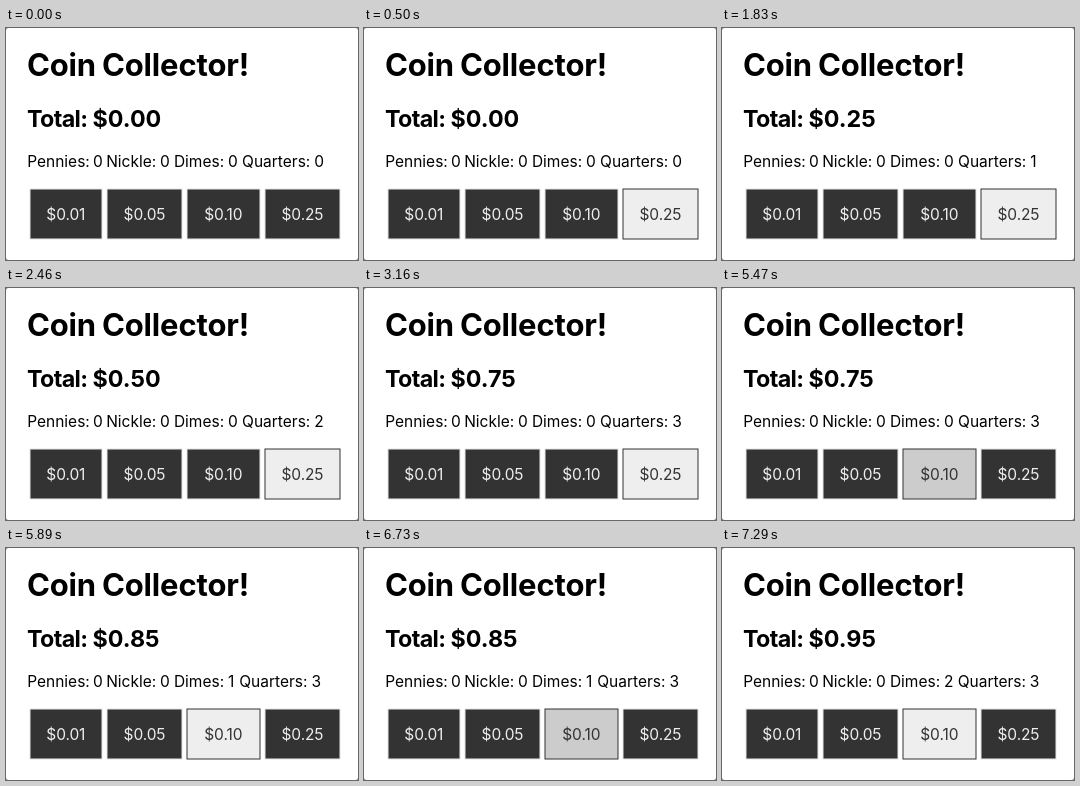
Write an HTML page that moves like this. It is 352 px wide and 232 px high and loops after 8 s.

```html
<!DOCTYPE html>
<html lang="en">
<head>
<meta charset="utf-8">
<title>Coin Collector!</title>
<style>
  html, body { margin: 0; width: 100%; height: 100%; overflow: hidden; background: #8c8c8c; }
  svg { display: block; width: 352px; height: 232px; }
  text { font: 15.5px Inter, "Liberation Sans", sans-serif; font-optical-sizing: none; fill: #000; }
  .mid text, text.mid { text-anchor: middle; }
  .title text { font-size: 31px; font-weight: 700; letter-spacing: -.15px; }
  .total text { font-size: 23.3px; font-weight: 700; }
  .total .label { letter-spacing: -.65px; }
  .coin rect { fill: #333; stroke: #e6e6e6; }
  .coin text { fill: #eee; letter-spacing: -.1px; text-anchor: middle; }
  .hover rect { fill: #eee; stroke: #333; }
  .press rect { fill: #ccc; stroke: #333; }
  .hover text, .press text { fill: #333; }
</style>
</head>
<body>
<svg viewBox="0 0 352 232">
  <rect width="352" height="232" rx="3" fill="#fff"/>
  <g class="title mid">
    <text x="55.5" y="47.5">Coin</text>
    <text x="169.5" y="47.5">Collector!</text>
  </g>
  <g class="total">
    <text class="label mid" x="51.2" y="99">Total:</text>
    <text id="total" x="86.5" y="99">$0.00</text>
  </g>
  <g>
    <text class="mid" x="52.5" y="139">Pennies:</text>
    <text x="86.9" y="139">0</text>
    <text class="mid" x="125.2" y="139">Nickle:</text>
    <text x="153.9" y="139">0</text>
    <text class="mid" x="193" y="139">Dimes:</text>
    <text id="dimes" x="221.9" y="139">0</text>
    <g id="tail">
      <text class="mid" x="270.2" y="139">Quarters:</text>
      <text id="quarters" x="308.2" y="139">0</text>
    </g>
  </g>
  <g class="coin"><rect x="24" y="161" width="72" height="50"/><text x="59.8" y="192">$0.01</text></g>
  <g class="coin"><rect x="101" y="161" width="75" height="50"/><text x="138.5" y="192">$0.05</text></g>
  <g class="coin" id="dime"><rect x="181" y="161" width="73" height="50"/><text x="217.3" y="192">$0.10</text></g>
  <g class="coin" id="quarter"><rect x="259" y="161" width="75" height="50"/><text x="296.5" y="192">$0.25</text></g>
</svg>
<script>
  const LOOP = 8000;
  // start in ms, dime button, quarter button, dimes, quarters
  const steps = [
    [0, '', '', 0, 0],
    [500, '', 'hover', 0, 0],
    [1550, '', 'press', 0, 0],
    [1830, '', 'hover', 0, 1],
    [2250, '', 'press', 0, 1],
    [2460, '', 'hover', 0, 2],
    [3020, '', 'press', 0, 2],
    [3160, '', 'hover', 0, 3],
    [4140, '', '', 0, 3],
    [4210, 'hover', '', 0, 3],
    [5470, 'press', '', 0, 3],
    [5890, 'hover', '', 1, 3],
    [6730, 'press', '', 1, 3],
    [7290, 'hover', '', 2, 3]
  ];
  const tailShift = [0, -2.8, -0.4];
  const $ = id => document.getElementById(id);
  let shown;

  function show([, dime, quarter, dimes, quarters]) {
    $('dime').setAttribute('class', 'coin ' + dime);
    $('quarter').setAttribute('class', 'coin ' + quarter);
    $('dimes').textContent = dimes;
    $('quarters').textContent = quarters;
    $('total').textContent = '$' + (dimes * 0.1 + quarters * 0.25).toFixed(2);
    $('tail').setAttribute('transform', `translate(${tailShift[dimes]} 0)`);
  }

  function tick() {
    const t = performance.now() % LOOP;
    const step = steps.filter(s => s[0] <= t).pop();
    if (step !== shown) show(shown = step);
    requestAnimationFrame(tick);
  }
  tick();
</script>
</body>
</html>
```
